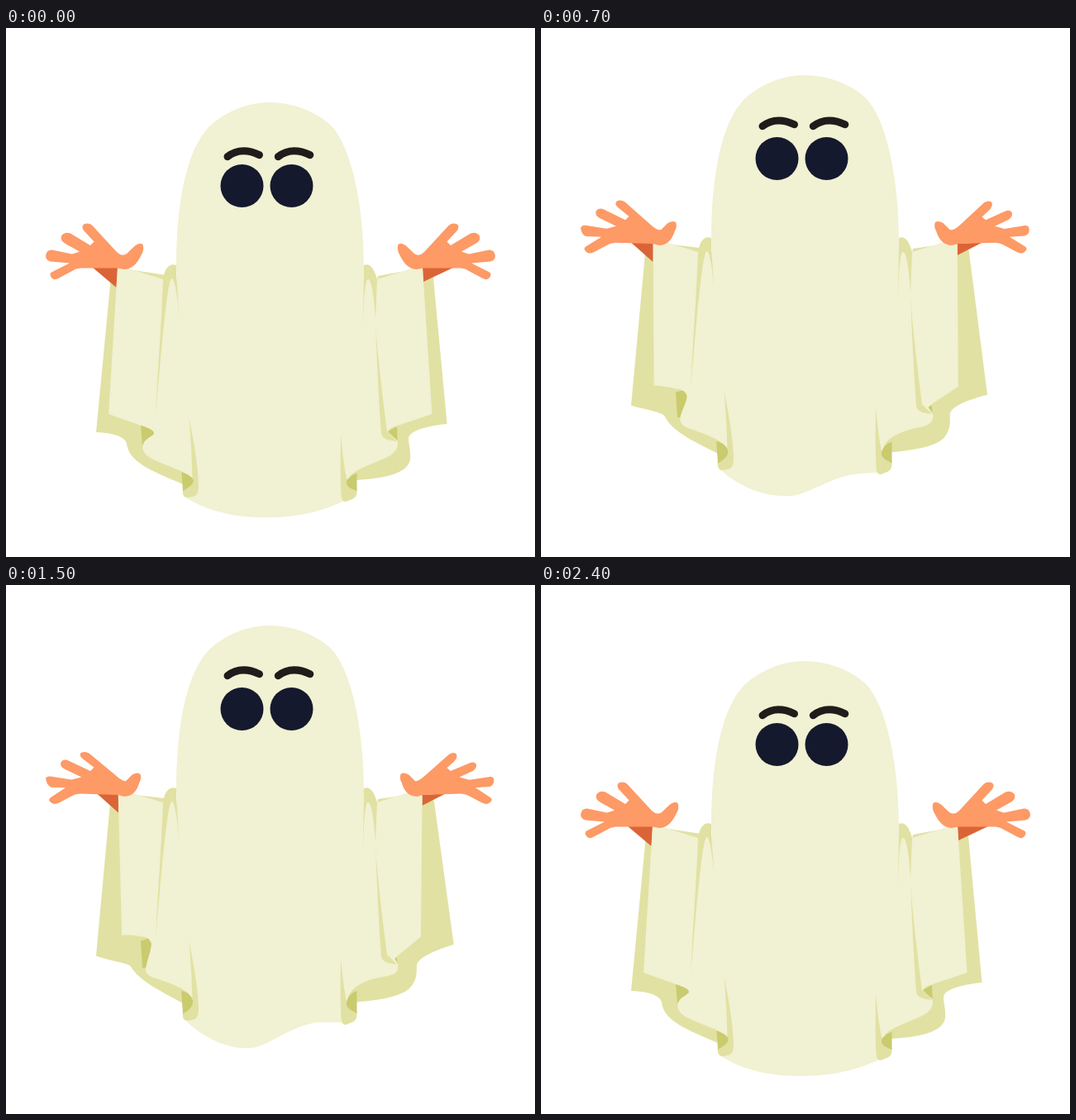
An HTML page with a canvas that plays this animation: 640x640 px, repeating every 2500 ms.

```html
<!DOCTYPE html>
<html lang="en">
<head>
<meta charset="utf-8">
<title>Floating ghost</title>
<style>
html, body { margin: 0; width: 100%; height: 100%; overflow: hidden; background: #fff; }
canvas { display: block; width: 100vmin; height: 100vmin; }
</style>
</head>
<body>
<canvas id="stage" width="640" height="640"></canvas>
<script>
const ctx = document.getElementById('stage').getContext('2d');

const LIGHT = '#f1f1d3', MID = '#e1e1a3', DARK = '#c9cb6e';
const SKIN = '#fd9a66', WRIST = '#db6437', EYE = '#15192d', BROW = '#1f1c1b';
const LOOP = 2500, STEP = 100;

// Height of the ghost: [step, offset]
const FLOAT = [[0, 0], [3, -14], [7, -33], [11, -53], [12, -55], [13, -51],
  [15, -41], [18, -26], [20, -15.7], [24, 2]];

// Each shape has a low pose and a high pose with the same commands.
const backLeft = [
  'M135 290 L126.5 306 L109 489 C130 490 144 494 146 503 C149 527 180 537 215 552.5 L240 540 L200 300 Z',
  'M136 293 L126 303 L109 490 C128 498 146 499 151 501.5 C166 520 183 528 213 545.5 L240 535 L200 300 Z'];
const backRight = [
  'M504 290 L517 302 L533.5 479 C505 482 487 488 487 497 C487 504 490 512 489 522 C486 540 455 545 424 547 L400 535 L450 300 Z',
  'M503 293 L518 302 L543.5 475.5 C515 485 500 495 499 502 C499 510 499 520 490 528 C478 540 445 543 424 545.5 L400 530 L450 300 Z'];

const foldLeft = [
  'M163 480 L165 505 L170 505 L181 490 L172 482 Z',
  'M163 470 L165 504 L174 504 L176 474 L172 465.5 Z'];
const foldRight = [
  'M462 488 L473 482 L473.5 500 Z',
  'M472 494 L472.5 493.5 L474 500 Z'];

const sleeveLeft = [
  'M135 290 L124 467 L163 481 C172 484 179 487 179 490 C179 494 169 495 165.5 504 C164 510 168 517 176 521 C192 529 210 534 221 541 L226 548 L260 545 L260 304 L190 304 L147 290.5 Z',
  'M136 296 L143.5 464.5 C152 462.5 158 462.5 163 463 C172 463 177 467 175 474 C174 484 172 492 170 504 C169 510 173 513 179 515 C196 520 214 526 220 534 L226 545 L260 545 L260 304 L190 304 L153 293 Z'
].map((d, i) => i ? d : d.replace('L163 481', 'C137 471.7 150 476.4 163 481'));
const sleeveRight = [
  'M504 290 L515.5 467 L468 483 Q462 486 462 489 L473.5 499 C476 510 468 517 455 522 C438 529 425 534 417 541 L411 550 L380 545 L380 304 L449 304 L494 290 Z',
  'M503.5 297 L499 466.5 L474 492 Q472 493 472 494 L474 499 C476 508 472 511 462 512.5 C440 515 427 520 418 531 L411 543 L380 545 L380 304 L449 304 L490 291 Z'];

const TORSO = 'M226 560 L224 480 L209 348 L206 290 C206 208 219 147 246 119 C268 99 295 90 319 90 C345 90 370 99 390 115 C416 137 433 210 433 290 L431 480 L407 500 ';
const body = [
  TORSO + 'L408 573 C402 575 396 578 390 580 C372 587 345 592 318 592 C275 593 240 583 216 567 Z',
  TORSO + 'L408 570 C400 569 394 568 382 568 C345 566 315 600 293 603 C265 606 234 587 216 566 Z'];

const shoulderLeft = 'M190 304 C192 289 199 284 206 287 L206 298 L209.5 348 C207 322 204 303 200.5 303 C195 303 187 400 181 472 C183 420 188 360 190 304 Z';
const shoulderRight = 'M449 304 C445 289 439 284 433 287 L433 300 L431.5 368 C433 330 434 304 438 304 C443 304 446 335 447 352 Z';
const crease = 'M447 360 C449 405 451 450 454 490 C455 497 462 499 473 500 L461 488 C456 450 450 400 447 360 Z';
const pleatLeft = 'M221.5 472 C224 500 225 525 225.5 545 L214 557 C213 565 215 568 220 568 L226 567 C231 566 233 562 233 553 C232 525 226 495 221.5 472 Z';
const pleatRight = 'M405 492 C407 515 409 530 412 545 L424.5 557 C425 566 423 569 416 571 C411 574 407 574 406 568 C404.5 555 404.5 525 405 492 Z';
const hemLeft = [
  'M212.5 537 L221 541 C229 546 230 551 214 560 Z',
  'M212 530.5 L219 533 C228 540 230 551 214 559.5 Z'];
const hemRight = [
  'M424.5 538.5 C418 541 411 546 412 551 C413 556 419 558 424.5 560 Z',
  'M424.5 531 C417 532 411 541 412 548 C413 553 419 556 424.5 559 Z'];

const wristLeft = ['M105 290 L135 290 L133.5 314 Z', 'M111 294 L136 295 L136.5 317 Z'];
const wristRight = ['M504 290 L541 290 L505 307 Z', 'M503.5 296 L530 294 L503.5 308 Z'];

const handLow = 'M135 290.5 L90 290.5 Q84 291 80 294 L64 302.5 Q58 306 55 302 Q52 298 55 295.5 L77 284.5 L54 282.5 Q48 281 48 275.5 Q49 268 56 268.5 L80 273.5 L89 270.5 L72 261 Q65 257 67 251.5 Q71 246 78 248.5 L102 263 L106.5 258.5 L94 245 Q91 240 94 237.5 Q100 235 104.5 239 L134 271 Q140 277 146 273 L156 263.5 Q162 259 165.5 262 Q168 268 163 276 Q155 292 143 292 Z';
const palm = 'M136 296 L90 294 Q84 294 79 297 L66 304 Q59 308 55 305 Q50 302 53 299 L71 286.5 ';
const thumb = 'L132 271 Q142 280 145 279 L152 272 Q158 269 161.5 271 Q164 275 161 281 Q157 298 143 298 Z';
const handLeft = [handLow, palm +
  'L55 286.5 Q50 285 48 275 Q49 273 53 273.5 L79 277 L92 274 L72 265 Q65 262 66 257 Q69 252 75 254.5 L102 266.5 L106.5 262.5 L93 253 Q87 249 90 245.5 Q95 243 100 246 ' + thumb];
const handRight = [handLow, palm +
  'L55 285.5 Q50 284 50 278 Q50 273 54 274 L79 277.5 L92 274 L76 267 Q71 264 72 259 Q74 256 79 258 L102 266.5 L106.5 263 L98 256 Q93 250 96 246.5 Q99 244.5 104 247.5 ' + thumb];

function blend([low, high], m) {
  const to = high.match(/-?[\d.]+/g);
  let i = 0;
  return low.replace(/-?[\d.]+/g, n => +n + (to[i++] - n) * m);
}

function fill(shape, color, m) {
  const d = Array.isArray(shape) ? blend(shape, m) : shape;
  ctx.fillStyle = color;
  ctx.fill(new Path2D(d));
}

function eye(x) {
  ctx.fillStyle = EYE;
  ctx.beginPath();
  ctx.arc(x, 191, 26, 0, Math.PI * 2);
  ctx.fill();
}

function brow(x, y) {
  ctx.beginPath();
  ctx.moveTo(x, y);
  ctx.bezierCurveTo(x + 11, y - 8.5, x + 24, y - 9, x + 38.5, y - 2);
  ctx.stroke();
}

function offsetAt(step) {
  const i = Math.max(1, FLOAT.findIndex(k => k[0] >= step));
  const [s0, y0] = FLOAT[i - 1], [s1, y1] = FLOAT[i];
  return y0 + (y1 - y0) * (step - s0) / (s1 - s0);
}

function draw(step) {
  const y = offsetAt(step);
  const q = Math.min(1, Math.max(0, (3 - y) / 60));
  const m = q * q * (3 - 2 * q);

  ctx.setTransform(1, 0, 0, 1, 0, 0);
  ctx.fillStyle = '#fff';
  ctx.fillRect(0, 0, 640, 640);
  ctx.translate(0, y);

  fill(backLeft, MID, m);
  fill(backRight, MID, m);
  fill(foldLeft, DARK, m);
  fill(foldRight, DARK, m);
  fill(wristLeft, WRIST, m);
  fill(wristRight, WRIST, m);
  fill(sleeveLeft, LIGHT, m);
  fill(sleeveRight, LIGHT, m);
  fill(body, LIGHT, m);

  fill(shoulderLeft, MID);
  fill(shoulderRight, MID);
  fill(crease, MID);
  fill(pleatLeft, MID);
  fill(pleatRight, MID);
  fill(hemLeft, DARK, m);
  fill(hemRight, DARK, m);

  fill(handLeft, SKIN, m);
  ctx.save();
  ctx.translate(640, 0);
  ctx.scale(-1, 1);
  fill(handRight, SKIN, m);
  ctx.restore();

  eye(285.5);
  eye(345.5);
  ctx.strokeStyle = BROW;
  ctx.lineWidth = 9;
  ctx.lineCap = 'round';
  brow(268, 155.7 - 6 * m);
  brow(329.3, 155.7 - 6 * m);
}

const start = performance.now();
function tick() {
  const t = (performance.now() - start) % LOOP;
  draw(Math.floor(t / STEP));
  requestAnimationFrame(tick);
}
tick();
</script>
</body>
</html>
```
